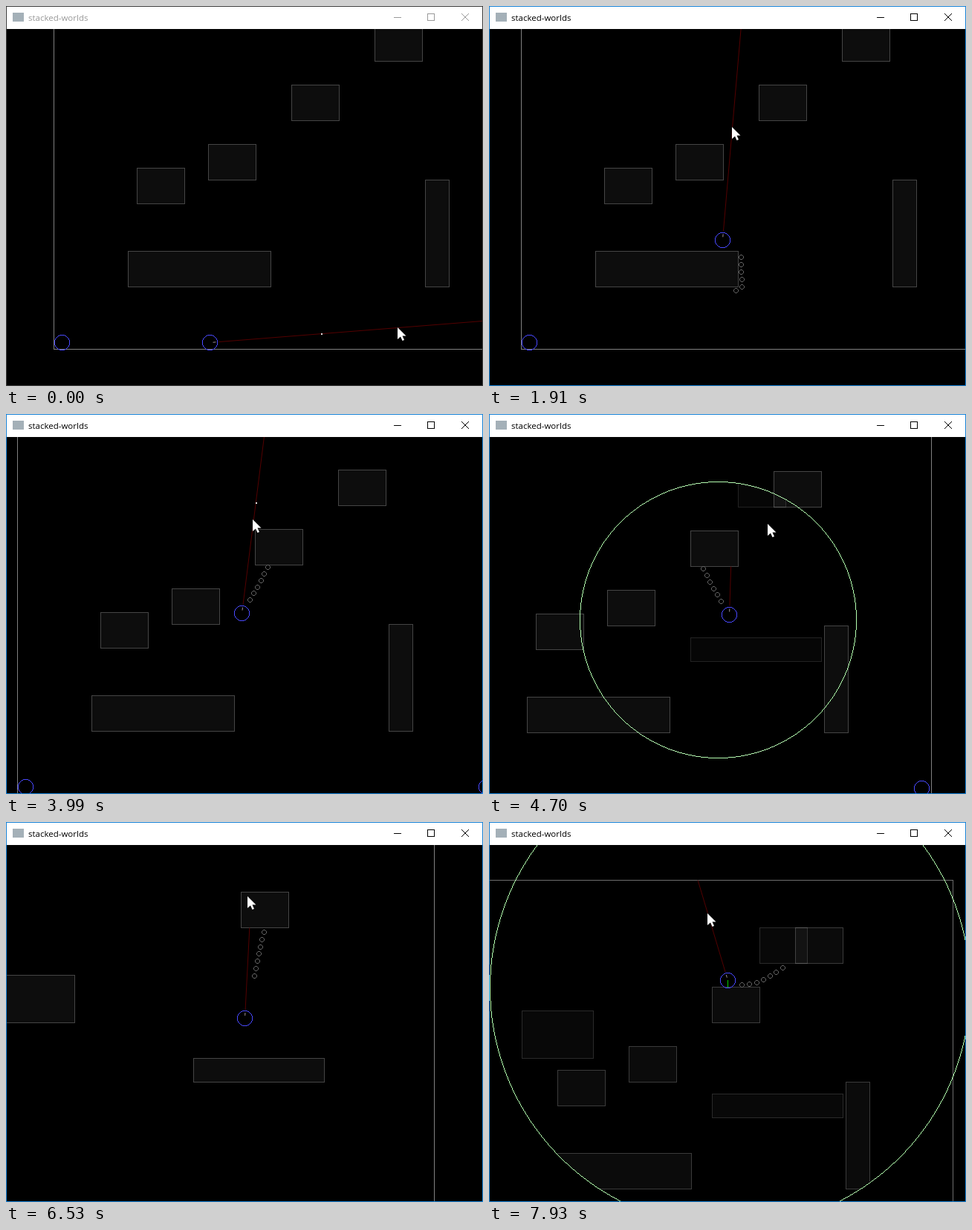
Animation, 642 px wide and 512 px high, one loop 8 s. Source, as an HTML page with a canvas:

```html
<!DOCTYPE html>
<html lang="en">
<head>
<meta charset="utf-8">
<title>stacked-worlds</title>
<style>
  html, body { margin: 0; width: 100%; height: 100%; overflow: hidden; background: #000; }
  canvas { display: block; }
</style>
</head>
<body>
<canvas id="stage" width="642" height="512"></canvas>
<script>
const ctx = document.getElementById('stage').getContext('2d');
const LOOP = 8000, STEP = 76.9, STEP_OFFSET = 14;
const BLUE = '#4848ff';
const REACH = 150;
const AIR_JUMP = 5844;

const box = (x, y, w, h) => ({ x, y, w, h });
const BOUNDS = box(64, -38, 644, 500);
const WORLD_A = [
  ...[[176, 218], [272, 186], [384, 106], [496, 26]].map(([x, y]) => box(x, y, 64, 48)),
  box(164, 330, 192, 48), box(564, 234, 32, 144)
];
const WORLD_B = [box(448, 26, 64, 48), box(128, 138, 96, 64), box(384, 250, 176, 32)];

const SWITCHES = [
  { start: 4484, active: 4860, x: 421, y: 226, from: WORLD_A, to: WORLD_B },
  { start: 7562, active: 7600, x: 408, y: 107, from: WORLD_B, to: WORLD_A }
];

// The first rope wraps around a box corner; the others sag when slack.
const CORNER = { x: 356, y: 378 };
const ROPES = [
  { start: 950, end: 2000, x: 353, y: 383, beads: 6, bends: [[361, 379], [360, 338]] },
  { start: 2735, end: 3410, x: 314, y: 243, beads: 7, length: 89 },
  { start: 3991, end: 4860, x: 401, y: 157, beads: 6, length: 71 },
  { start: 6084, end: LOOP, x: 478.5, y: 80, beads: 7, length: 81.5 }
];

const clamp = (v, lo, hi) => Math.min(hi, Math.max(lo, v));
const mix = (a, b, k) => a + (b - a) * k;
const linear = u => u;
const pendulum = u => (1 - Math.cos(Math.PI * u)) / 2;

// The player's route: every move continues from the end of the previous one.
const route = [];
let here = { x: 274, y: 453 }, clock = 0;

function addMove(end, at) {
  route.push({ start: clock, end, at });
  here = at(1);
  clock = end;
}

function hop(end, x, y, height = 0) {
  const from = here;
  addMove(end, u => ({
    x: mix(from.x, x, u),
    y: mix(from.y, y, u) - 4 * height * u * (1 - u)
  }));
}

function swing(end, pivot, angle, radius, ease = linear) {
  const dx = here.x - pivot.x, dy = here.y - pivot.y;
  const angle0 = Math.atan2(dx, dy), radius0 = Math.hypot(dx, dy);
  addMove(end, u => {
    const a = mix(angle0, angle, ease(u)), r = mix(radius0, radius, u);
    return { x: pivot.x + r * Math.sin(a), y: pivot.y + r * Math.cos(a) };
  });
}

hop(900, 345, 453);
swing(1840, CORNER, 3.34, 67);
hop(2100, 318, 320);
hop(2735, 318, 320);
swing(3410, ROPES[1], 1.197, 91.3);
hop(3991, 366, 219, 10);
swing(4701, ROPES[2], .515, 71.2, pendulum);
hop(5040, 434, 240, 8);
hop(5684, 498, 240);
hop(6084, 520, 225, 22);
swing(7071, ROPES[3], -.8, 81.8);
swing(7562, ROPES[3], -1.205, 75.5);
hop(7640, 405, 97);
hop(LOOP, 405, 97);

function playerAt(time) {
  const t = Math.max(0, time);
  const move = route.find(m => t < m.end);
  return move.at((t - move.start) / (move.end - move.start));
}

// Places where the mouse pauses: [time, x, y].
const PAUSES = [
  [0, 527, 433], [1870, 327, 163], [3153, 287, 134], [3230, 339, 134], [4614, 327, 148],
  [4690, 375, 148], [5800, 358, 81], [7110, 302, 112], [7880, 294, 123]
];

function cursorAt(time) {
  const t = Math.max(0, time);
  const i = PAUSES.findLastIndex(p => p[0] <= t);
  const a = PAUSES[i], b = PAUSES[i + 1] || a;
  const k = b === a ? 0 : pendulum((t - a[0]) / (b[0] - a[0]));
  return { x: mix(a[1], b[1], k), y: mix(a[2], b[2], k) };
}

function cameraAt(t) {
  const p = playerAt(t - STEP);
  return {
    x: Math.round(clamp(321 - p.x, -132, 0)),
    y: Math.round(clamp(271 - p.y, 0, 116))
  };
}

function line(x1, y1, x2, y2, color) {
  ctx.strokeStyle = color;
  ctx.beginPath();
  ctx.moveTo(x1, y1);
  ctx.lineTo(x2, y2);
  ctx.stroke();
}

// Hard-edged circle, one pixel wide, plotted by octants.
function ring(cx, cy, radius, color) {
  const x = Math.round(cx), y = Math.round(cy), r = Math.round(radius);
  ctx.fillStyle = color;
  for (let i = 0; i <= r * Math.SQRT1_2; i++) {
    const j = Math.round(Math.sqrt(r * r - i * i));
    for (const [dx, dy] of [[i, j], [j, i]]) {
      for (const px of [x - dx, x + dx]) {
        ctx.fillRect(px, y - dy, 1, 1);
        ctx.fillRect(px, y + dy, 1, 1);
      }
    }
  }
}

function drawBoxes(boxes, alpha) {
  ctx.globalAlpha = alpha;
  ctx.fillStyle = 'rgba(255, 255, 255, .05)';
  ctx.strokeStyle = 'rgba(255, 255, 255, .23)';
  for (const { x, y, w, h } of boxes) {
    ctx.fillRect(x, y, w + 1, h + 1);
    ctx.strokeRect(x + .5, y + .5, w, h);
  }
  ctx.globalAlpha = 1;
}

// The next world fades in within a growing circle while the last one fades out.
function drawWorlds(t) {
  const change = SWITCHES.findLast(s => t >= s.start);
  const age = change ? t - change.start : 0;
  const shown = clamp(1 - (age - 230) / 320, 0, 1);
  const fresh = clamp(age / 420, 0, 1);
  ctx.globalAlpha = Math.max(shown, fresh);
  ctx.strokeStyle = '#808080';
  ctx.strokeRect(BOUNDS.x + .5, BOUNDS.y + .5, BOUNDS.w, BOUNDS.h);
  drawBoxes(change ? change.from : WORLD_A, shown);
  if (!change) return;

  const radius = age * .9, growing = radius < 326;
  ctx.save();
  if (growing) {
    ctx.beginPath();
    ctx.arc(change.x, change.y, radius, 0, 7);
    ctx.clip();
  }
  drawBoxes(change.to, fresh);
  ctx.restore();
  if (growing) ring(change.x, change.y, radius, '#b4ffb0');
}

function ropePath(rope, p) {
  const start = [rope.x, rope.y], end = [p.x, p.y];
  if (rope.bends) return [start, ...rope.bends.filter(b => p.y < b[1]), end];
  const slack = rope.length - Math.hypot(p.x - rope.x, p.y - rope.y);
  const cx = mix(rope.x, p.x, .62);
  const cy = mix(rope.y, p.y, .62) + 4 + 3.4 * clamp(slack, 0, 6);
  return Array.from({ length: 21 }, (_, i) => {
    const u = i / 20;
    return [
      mix(mix(rope.x, cx, u), mix(cx, p.x, u), u),
      mix(mix(rope.y, cy, u), mix(cy, p.y, u), u)
    ];
  });
}

function drawRope(rope, p) {
  const path = ropePath(rope, p);
  let count = 0, walked = 0;
  for (let i = 1; i < path.length; i++) {
    const [ax, ay] = path[i - 1], [bx, by] = path[i];
    const length = Math.hypot(bx - ax, by - ay);
    for (; count < rope.beads && count * 10 <= walked + length; count++) {
      const k = (count * 10 - walked) / length;
      ring(mix(ax, bx, k), mix(ay, by, k), 3, '#606060');
    }
    walked += length;
  }
}

// Distance along a ray to the nearest box, or to the outer wall.
function castRay(p, dx, dy, boxes) {
  const span = (origin, d, lo, size) =>
    [(lo - origin) / d, (lo + size - origin) / d].sort((a, b) => a - b);
  const cross = ({ x, y, w, h }) => {
    const [x1, x2] = span(p.x, dx || 1e-6, x, w), [y1, y2] = span(p.y, dy || 1e-6, y, h);
    return [Math.max(x1, y1), Math.min(x2, y2)];
  };
  const hits = boxes.map(cross).filter(([near, far]) => near > 0 && near < far);
  return Math.min(cross(BOUNDS)[1], ...hits.map(hit => hit[0]));
}

function drawAim(t, p, camera, boxes) {
  const target = cursorAt(t - STEP);
  const angle = Math.atan2(target.y - camera.y - p.y, target.x - camera.x - p.x);
  const dx = Math.cos(angle), dy = Math.sin(angle);
  const distance = castRay(p, dx, dy, boxes);
  const x = p.x + .5, y = p.y + .5;
  const ray = (from, to, color) =>
    line(x + dx * from, y + dy * from, x + dx * to, y + dy * to, color);
  if (distance > 12) ray(12, distance, '#540000');
  ray(4, 8, '#a09098');
  if (distance > REACH) {
    ctx.fillStyle = '#ddd';
    ctx.fillRect(Math.round(p.x + dx * REACH), Math.round(p.y + dy * REACH), 2, 2);
  }
}

function drawPlayer(t, p) {
  const jumping = Math.abs(t - AIR_JUMP) < STEP / 2;
  const resting = p.y < 440 && p.y === playerAt(t - STEP).y;
  const x = Math.round(p.x), y = Math.round(p.y);
  ring(x, y, 10, BLUE);
  if (jumping) ring(x, y, 7, '#ddd');
  if (jumping || resting) line(x + .5, y, x + .5, y + 10, '#00d000');
}

function drawCursor(t) {
  const { x, y } = cursorAt(t);
  ctx.save();
  ctx.translate(Math.round(x), Math.round(y));
  const arrow = new Path2D('M0 0V16L4 12.5L6.5 18L9 17L6.5 11.5H11.5Z');
  ctx.strokeStyle = '#000';
  ctx.stroke(arrow);
  ctx.fillStyle = '#fff';
  ctx.fill(arrow);
  ctx.restore();
}

function drawWindow(focused) {
  const ink = focused ? '#000' : '#999';
  ctx.fillStyle = '#fff';
  ctx.fillRect(1, 1, 640, 30);
  ctx.fillStyle = '#a4b0b8';
  ctx.fillRect(9, 9, 15, 12);
  ctx.fillStyle = ink;
  ctx.font = '11.5px "Open Sans", "Noto Sans", sans-serif';
  ctx.fillText('stacked-worlds', 30, 20);
  line(522, 15.5, 532, 15.5, ink);
  ctx.strokeRect(567.5, 10.5, 9, 9);
  line(613, 10, 623, 20, ink);
  line(623, 10, 613, 20, ink);
  ctx.strokeStyle = focused ? '#1883d7' : '#3c3c3c';
  ctx.strokeRect(.5, .5, 641, 511);
}

function draw(t) {
  const p = playerAt(t), camera = cameraAt(t);
  const change = SWITCHES.findLast(s => t >= s.active);
  const boxes = change ? change.to : WORLD_A;
  ctx.fillStyle = '#000';
  ctx.fillRect(0, 0, 642, 512);

  ctx.save();
  ctx.beginPath();
  ctx.rect(1, 31, 640, 480);
  ctx.clip();
  ctx.translate(camera.x, camera.y);
  drawWorlds(t);
  ring(75, 453, 10, BLUE);
  ring(695 + 3 * clamp((t - 4700) / 800, 0, 1), 453, 10, BLUE);
  if (boxes === WORLD_B) ring(678, 453, 10, BLUE);
  for (const rope of ROPES) {
    if (t >= rope.start && t < rope.end) drawRope(rope, p);
  }
  drawAim(t, p, camera, boxes);
  drawPlayer(t, p);
  ctx.restore();

  drawWindow(t >= 150);
  drawCursor(t);
}

// The picture advances in even steps, like a screen recording.
const begun = performance.now();
function tick() {
  const t = (performance.now() - begun) % LOOP;
  draw(Math.floor((t + STEP_OFFSET) / STEP) * STEP);
  requestAnimationFrame(tick);
}
tick();
</script>
</body>
</html>
```
